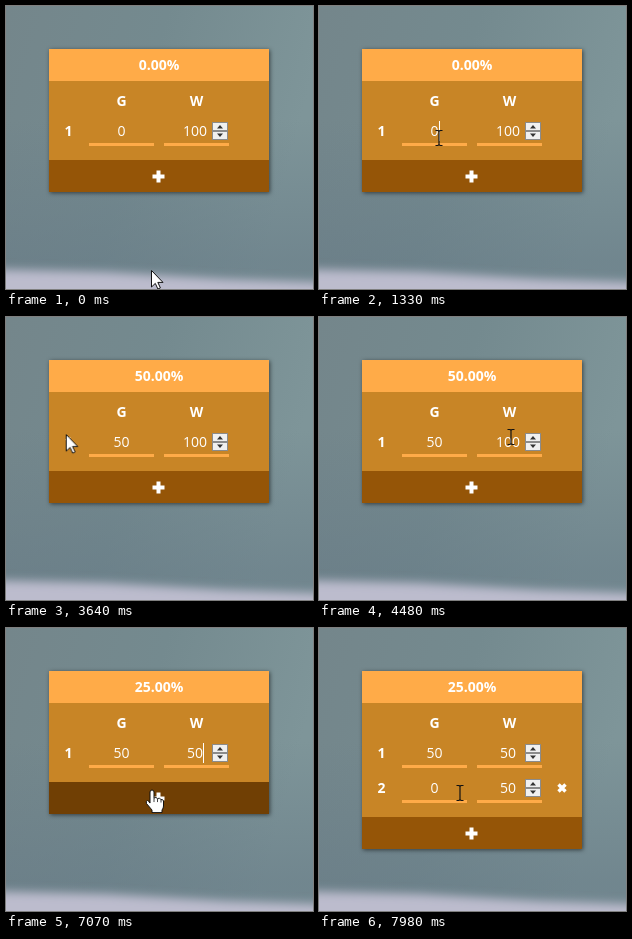
These frames come from a looping animation (307x283 px, 8 s). An HTML page:

```html
<!DOCTYPE html>
<html lang="en">
<head>
<meta charset="utf-8">
<title>Grade calculator</title>
<style>
html, body { margin: 0; width: 100%; height: 100%; overflow: hidden; background: #74888e; }
svg { display: block; width: 100vw; height: 100vh; }
text { font: 14px "Open Sans", "Noto Sans", sans-serif; fill: #fff; text-anchor: middle; }
.b { font-weight: 700; }
.panel { filter: drop-shadow(1px 1px 2px rgba(0, 0, 0, .55)); }
.line { fill: #ffab48; }

/* hard switches */
.s { animation: 8s step-end infinite; }
@keyframes title0 { 0% { opacity: 1 } 36.625%, 100% { opacity: 0 } }
@keyframes title50 { 0% { opacity: 0 } 36.625% { opacity: 1 } 73.375%, 100% { opacity: 0 } }
@keyframes title25 { 0% { opacity: 0 } 73.375%, 100% { opacity: 1 } }
@keyframes g0 { 0% { opacity: 1 } 34%, 100% { opacity: 0 } }
@keyframes g5 { 0% { opacity: 0 } 34% { opacity: 1 } 35.75%, 100% { opacity: 0 } }
@keyframes g50 { 0% { opacity: 0 } 35.75%, 100% { opacity: 1 } }
@keyframes w100 { 0% { opacity: 1 } 71.625%, 100% { opacity: 0 } }
@keyframes w5 { 0% { opacity: 0 } 71.625% { opacity: 1 } 72.5%, 100% { opacity: 0 } }
@keyframes w50 { 0% { opacity: 0 } 72.5%, 100% { opacity: 1 } }
@keyframes selG { 0% { opacity: 0 } 22.75% { opacity: 1 } 34%, 100% { opacity: 0 } }
@keyframes selW { 0% { opacity: 0 } 57.625% { opacity: 1 } 71.625%, 100% { opacity: 0 } }
@keyframes row { 0% { opacity: 0 } 94.375%, 100% { opacity: 1 } }
@keyframes drop { 0% { transform: none } 94.375%, 100% { transform: translateY(35px) } }
@keyframes caret {
  0% { opacity: 0; transform: translateX(120px) }
  16.5% { opacity: 1; transform: translateX(120px) }
  22.75% { opacity: 0; transform: translateX(120px) }
  34% { opacity: 1; transform: translateX(120px) }
  35.75% { opacity: 1; transform: translateX(124px) }
  41.875% { opacity: 0; transform: translateX(124px) }
  48.125% { opacity: 1; transform: translateX(124px) }
  54.375% { opacity: 0; transform: translateX(124px) }
  56.75% { opacity: 1; transform: translateX(193px) }
  57.625% { opacity: 0; transform: translateX(193px) }
  71.625% { opacity: 1; transform: translateX(193px) }
  72.5% { opacity: 1; transform: translateX(197px) }
  78.625% { opacity: 0; transform: translateX(197px) }
  84.875% { opacity: 1; transform: translateX(197px) }
  91.125%, 100% { opacity: 0; transform: translateX(197px) }
}

/* pointer shapes */
@keyframes arrow {
  0% { opacity: 1 } 6.8% { opacity: 0 } 12.25% { opacity: 1 } 13.9% { opacity: 0 }
  23.3% { opacity: 1 } 47.4% { opacity: 0 } 50.5% { opacity: 1 } 51% { opacity: 0 }
  85.4% { opacity: 1 } 86.5%, 100% { opacity: 0 }
}
@keyframes hand {
  0% { opacity: 0 } 6.8% { opacity: 1 } 12.25% { opacity: 0 }
  86.5% { opacity: 1 } 97.875%, 100% { opacity: 0 }
}
@keyframes beam {
  0% { opacity: 0 } 13.9% { opacity: 1 } 23.3% { opacity: 0 } 47.4% { opacity: 1 }
  50.5% { opacity: 0 } 51% { opacity: 1 } 85.4% { opacity: 0 } 97.875%, 100% { opacity: 1 }
}

/* smooth motion */
.bar { fill: #955507; animation: hover 8s linear infinite; }
@keyframes hover {
  0%, 6.8%, 14%, 86.5%, 99.7%, 100% { fill: #955507 }
  8.6%, 12.25%, 88.25%, 97.8% { fill: #703f04 }
}
.pointer { animation: move 8s linear infinite; }
@keyframes move {
  0%, .5% { transform: translate(145px, 264px); animation-timing-function: ease-in-out }
  10.5%, 10.9% { transform: translate(108px, 164px) }
  13.125% { transform: translate(114px, 143px) }
  14% { transform: translate(119px, 139px) }
  15.75%, 21% { transform: translate(120px, 132px) }
  25.375%, 43.75% { transform: translate(52px, 117px); animation-timing-function: ease-in-out }
  54.25% { transform: translate(187px, 119px) }
  56%, 61.25% { transform: translate(192px, 120px) }
  62.125%, 79.625% { transform: translate(194px, 120px) }
  81.375%, 83.125% { transform: translate(184px, 113px) }
  87.25%, 88.375% { transform: translate(146px, 162px) }
  91.875%, 100% { transform: translate(141px, 165px) }
}
</style>
</head>
<body>
<svg viewBox="0 0 307 283" preserveAspectRatio="none">
  <defs>
    <linearGradient id="wall" x2="1" y2=".25">
      <stop stop-color="#74868b"/>
      <stop offset=".5" stop-color="#748a8f"/>
      <stop offset="1" stop-color="#7e9599"/>
    </linearGradient>
    <linearGradient id="shade" x2="0" y2="1">
      <stop offset=".4" stop-color="#667a86" stop-opacity="0"/>
      <stop offset=".9" stop-color="#667a86" stop-opacity=".55"/>
    </linearGradient>
    <filter id="soft" x="-20%" y="-100%" width="140%" height="300%"><feGaussianBlur stdDeviation="5"/></filter>
    <g id="spin" shape-rendering="crispEdges">
      <path fill="#8b8b8b" d="M206 116h16v18h-16z"/>
      <path fill="#f0f0f0" d="M207 117h14v7h-14zM207 126h14v7h-14z"/>
      <path fill="#333" shape-rendering="auto" d="M211 122.5l3-3.5 3 3.5zM211 127.5l3 3.5 3-3.5z"/>
    </g>
    <path id="lines" class="line" d="M83 137h65v3h-65zM158 137h65v3h-65z"/>
  </defs>

  <rect width="307" height="283" fill="url(#wall)"/>
  <rect width="307" height="283" fill="url(#shade)"/>
  <path d="M-30 263L100 266 220 273 340 277V310H-30z" fill="#bcbccd" filter="url(#soft)"/>

  <g class="panel">
    <rect x="43" y="43" width="220" height="32" fill="#ffab48"/>
    <rect x="43" y="75" width="220" height="79" fill="#c88526"/>
    <rect class="s" style="animation-name:row" x="43" y="153" width="220" height="37" fill="#c88526"/>
    <g class="s" style="animation-name:drop">
      <rect class="bar" x="43" y="154" width="220" height="32"/>
      <path fill="#fff" d="M150.5 165h4v4h4v4h-4v4h-4v-4h-4v-4h4z" transform="translate(0 -.5)"/>
    </g>
  </g>

  <g class="b">
    <text class="b s" style="animation-name:title0" x="153" y="64">0.00%</text>
    <text class="b s" style="animation-name:title50" x="153" y="64">50.00%</text>
    <text class="b s" style="animation-name:title25" x="153" y="64">25.00%</text>
    <text class="b" x="115.5" y="100">G</text>
    <text class="b" x="190.5" y="100">W</text>
    <text class="b" x="62.5" y="130">1</text>
  </g>

  <use href="#lines"/>
  <use href="#spin"/>
  <g fill="#0078d7">
    <rect class="s" style="animation-name:selG" x="111" y="115" width="9" height="20"/>
    <rect class="s" style="animation-name:selW" x="177" y="115" width="24" height="20"/>
  </g>
  <text class="s" style="animation-name:g0" x="115.5" y="130">0</text>
  <text class="s" style="animation-name:g5" x="115.5" y="130">5</text>
  <text class="s" style="animation-name:g50" x="115.5" y="130">50</text>
  <text class="s" style="animation-name:w100" x="189" y="130">100</text>
  <text class="s" style="animation-name:w5" x="189" y="130">5</text>
  <text class="s" style="animation-name:w50" x="189" y="130">50</text>
  <rect class="s" style="animation-name:caret" y="115" width="1" height="20" fill="#fff"/>

  <g class="s" style="animation-name:row">
    <g transform="translate(0 35)">
      <use href="#lines"/>
      <use href="#spin"/>
      <text class="b" x="62.5" y="130">2</text>
      <text x="115.5" y="130">0</text>
      <text x="189" y="130">50</text>
      <path d="M239.5 121.5l7 7m0-7l-7 7" stroke="#fff" stroke-width="3.4"/>
    </g>
  </g>

  <g class="pointer">
    <path class="s" style="animation-name:arrow" d="M.5 .5V17L4.3 13.4 6.9 19 9.4 17.9 6.8 12.4H12z" fill="#fff" stroke="#111"/>
    <g class="s" style="animation-name:hand" stroke="#111" stroke-linejoin="round">
      <path fill="#fff" d="M-2 13V2Q-2 0 0 0T2 2V8Q4 6.5 5.5 8.5 7.5 7.5 9 9.5 11 9 11.5 11V16Q11.5 18 10 20V22.5H0V20L-5.5 13.5Q-6.5 11 -4.5 10.5 -3.5 10.5 -2 13z"/>
      <path fill="none" stroke-width=".8" d="M2 8v4M5.5 9v3M9 10v2.5"/>
    </g>
    <path class="s" style="animation-name:beam" d="M-3.5 -7.5h2.5l1 1 1-1h2.5M0 -7V7M-3.5 7.5h2.5l1-1 1 1h2.5" fill="none" stroke="#111" stroke-width="1.2"/>
  </g>
</svg>
</body>
</html>
```
